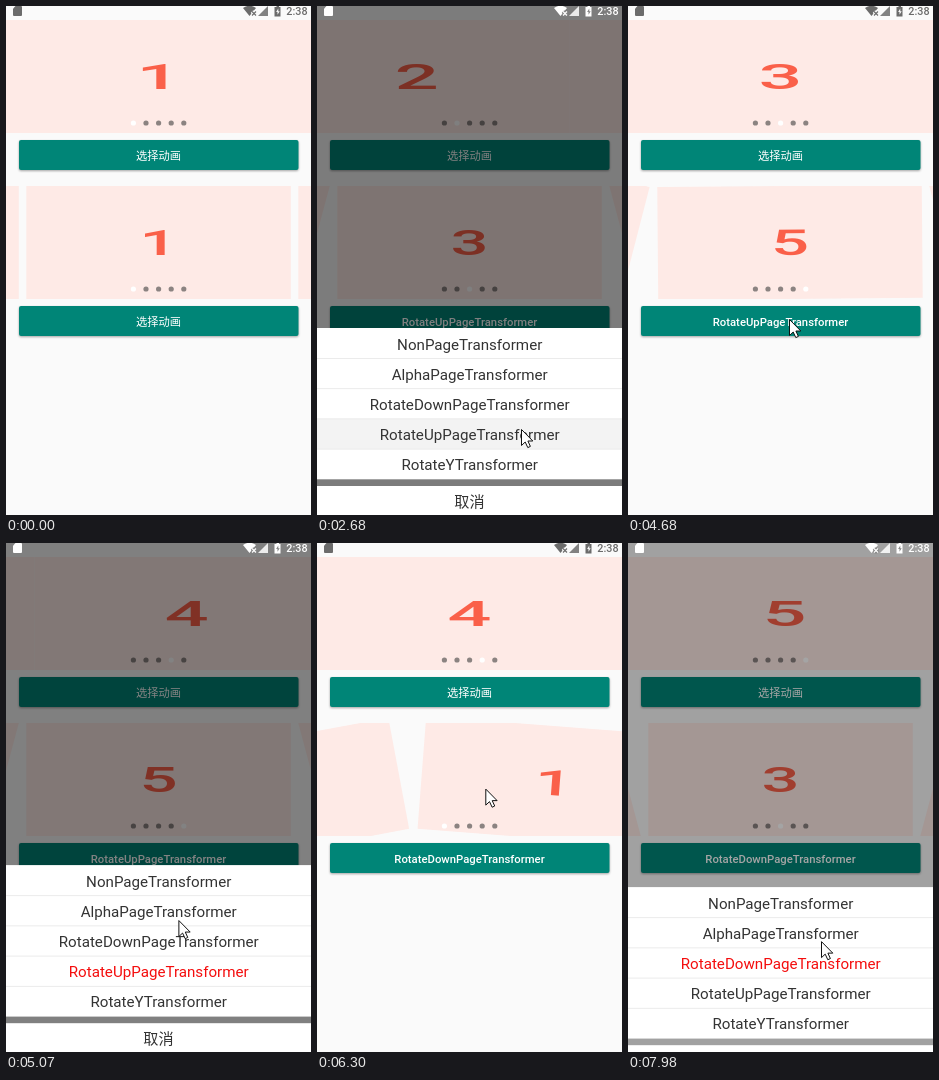
An HTML page for the animation above (8000 ms loop, 305 px wide and 509 px high).

```html
<!DOCTYPE html>
<html lang="zh">
<head>
<meta charset="utf-8">
<title>Banner transitions</title>
<style>
  html, body { margin: 0; width: 100%; height: 100%; overflow: hidden; background: #fafafa; }
  svg { display: block; width: 305px; height: 509px; }
  text { font-family: Roboto, "Noto Sans CJK SC", "Noto Sans CJK", sans-serif; text-anchor: middle; }
  .page rect { fill: #feeae6; }
  .digit { font-size: 35.5px; font-weight: 500; fill: #fa6049; }
  .button rect { fill: #008577; filter: drop-shadow(0 1px 1px rgba(0, 0, 0, .35)); }
  .button text { font-size: 11.3px; font-weight: 500; fill: #fff; }
  .row text { font-size: 15.15px; fill: #333; }
  .clock { font-size: 10.8px; font-weight: 500; }
  #status { fill: var(--ink); --ink: #6b6b6b; --back: #fafafa; }
  #status.light { --ink: #fff; --back: #868686; }
</style>
</head>
<body>
<svg viewBox="0 0 305 509">
  <defs>
    <clipPath id="topClip"><rect y="14" width="305" height="113"/></clipPath>
    <clipPath id="lowClip"><rect y="180" width="305" height="113"/></clipPath>
    <path id="cross" d="M246 5.500l4 4m0-4l-4 4"/>
  </defs>
  <rect width="305" height="509" fill="#fafafa"/>
  <g id="topPages" clip-path="url(#topClip)"></g>
  <g id="lowPages" clip-path="url(#lowClip)"></g>
  <g id="topDots"></g>
  <g id="lowDots"></g>
  <g class="button">
    <rect x="13" y="134" width="279.5" height="30" rx="2"/>
    <text x="152.5" y="153.8">选择动画</text>
  </g>
  <g class="button">
    <rect x="13" y="300" width="279.5" height="30" rx="2"/>
    <text id="label" x="152.5" y="319.8"></text>
  </g>
  <rect id="dim" width="305" height="509"/>
  <g id="status">
    <path d="M9.5 0H15Q16 0 16 1V9Q16 10 15 10H8Q7 10 7 9V2.7Z"/>
    <path d="M237 2Q243.500 -2.500 250 2L243.500 10Z"/>
    <use href="#cross" stroke="var(--back)" stroke-width="3.500"/>
    <use href="#cross" stroke="var(--ink)" stroke-width="1.100"/>
    <path d="M262 0V10H252Z" opacity=".85"/>
    <path d="M270.500 0h2.500v1h1.500v9.500h-6V1h2z"/>
    <path d="M272.300 2.500l-2.200 3.500h1.400v2.800l2.200-3.600h-1.400z" fill="var(--back)"/>
    <text class="clock" x="291" y="9">2:38</text>
  </g>
  <g id="sheet">
    <rect y="322" width="305" height="151" fill="#fff"/>
    <g id="rows"></g>
    <g class="row">
      <rect y="480" width="305" height="40" fill="#fff"/>
      <text x="152.500" y="500.500">取消</text>
    </g>
  </g>
  <g id="cursor">
    <circle id="press" r="12.300" fill="#fbe94f" opacity=".82"/>
    <path d="M.5 .5V16.500L4.200 13L6.800 18.600L9.400 17.400L6.900 12H11.800Z" fill="#fff" stroke="#111"/>
  </g>
</svg>
<script>
const LOOP = 8000, SLIDE = 700, FADE = 300, TICK = 76.7, FIRST_TICK = 146;
const ROW_TOP = 322.3, ROW_HEIGHT = 30.2;
const NAMES = ['Non', 'Alpha', 'RotateDown', 'RotateUp', 'RotateY'];
const fullName = name => name + (name === 'RotateY' ? 'Transformer' : 'PageTransformer');
const DOWN = 2, UP = 3;

const topSlides = [880, 2651, 4790, 7563];
const lowSlides = [925, 1500, 3540, 4325, 6130, 6800, 7200];
const picks = [{ at: 2670, row: UP }, { at: 5735, row: DOWN }];
const dialogs = [
  { open: 1470, close: 2700 },
  { open: 4760, close: 5790 },
  { open: 7755, close: 9000 }
];
const presses = [[1500, 1560], [3510, 3680], [4700, 4780], [6120, 6250], [7100, 7250], [7700, 7760]];
const pointer = [
  [140, 306, 512], [900, 235, 390], [1400, 208, 309], [1540, 208, 309],
  [1800, 279, 395], [2200, 193, 437], [2560, 204, 423], [2750, 204, 423],
  [3450, 230, 240], [3600, 230, 240], [3950, 130, 242], [4200, 215, 245],
  [4640, 161, 313], [4800, 161, 313], [5250, 180, 420], [5650, 168, 399],
  [5850, 168, 399], [6120, 230, 245], [6400, 130, 246], [6850, 215, 246],
  [7180, 215, 246], [7380, 130, 250], [7640, 188, 313], [7770, 188, 313],
  [7960, 193, 398], [8000, 193, 399]
];

const $ = id => document.getElementById(id);
const clamp = (v, lo = 0, hi = 1) => Math.min(hi, Math.max(lo, v));

function add(parent, tag, attrs = {}) {
  const el = document.createElementNS('http://www.w3.org/2000/svg', tag);
  for (const key in attrs) el.setAttribute(key, attrs[key]);
  return parent.appendChild(el);
}

function makeCarousel(id, box) {
  const pages = [-1, 0, 1].map(() => {
    const group = add($(id + 'Pages'), 'g', { class: 'page' });
    add(group, 'rect', { width: box.w, height: 113 });
    const digit = add(group, 'text', {
      class: 'digit',
      transform: `translate(${box.w / 2} 69) scale(${box.w / 140} 1)`
    });
    return { group, digit };
  });
  const dots = [0, 1, 2, 3, 4].map(i =>
    add($(id + 'Dots'), 'circle', { cx: 127.4 + i * 12.6, cy: box.y + 103, r: 2.6 }));
  return { ...box, pages, dots };
}

const topBanner = makeCarousel('top', { x: 0, y: 14, w: 305, pitch: 305 });
const lowBanner = makeCarousel('low', { x: 20.3, y: 180, w: 264.5, pitch: 272 });

const rows = NAMES.map((name, i) => {
  const y = ROW_TOP + i * ROW_HEIGHT;
  const group = add($('rows'), 'g', { class: 'row' });
  const back = add(group, 'rect', { y, width: 305, height: ROW_HEIGHT });
  if (i) add(group, 'rect', { y: y - 0.4, width: 305, height: 0.8, fill: '#e6e6e6' });
  const text = add(group, 'text', { x: 152.7, y: y + 21.2 });
  text.textContent = fullName(name);
  return { back, text };
});

// Each slide advances one page with a quintic ease-out.
const position = (slides, t) => slides.reduce(
  (sum, start) => sum + 1 - (1 - clamp((t - start) / SLIDE)) ** 5, 0);

// Pages swing up to 15 degrees about their top or bottom edge.
function tilt(mode, offset, w) {
  if (mode !== UP && mode !== DOWN) return '';
  const p = clamp(offset, -1, 1);
  const angle = 15 * p * (mode === UP ? -1 : 1);
  return `rotate(${angle} ${w * (1 - p) / 2} ${mode === UP ? 0 : 113})`;
}

function drawCarousel(c, slides, t, mode) {
  const pos = position(slides, t), base = Math.round(pos);
  c.pages.forEach(({ group, digit }, i) => {
    const index = base + i - 1, offset = index - pos;
    group.setAttribute('transform',
      `translate(${c.x + offset * c.pitch} ${c.y}) ${tilt(mode, offset, c.w)}`);
    digit.textContent = (index + 5) % 5 + 1;
  });
  c.dots.forEach((dot, i) => dot.setAttribute('fill', i === base % 5 ? '#fff' : '#8b8381'));
}

function pointerAt(t) {
  const next = pointer.findIndex(k => k[0] > t);
  if (next < 1) return [400, 600];
  const [t0, x0, y0] = pointer[next - 1], [t1, x1, y1] = pointer[next];
  const u = (t - t0) / (t1 - t0), e = u * u * (3 - 2 * u);
  return [x0 + (x1 - x0) * e, y0 + (y1 - y0) * e];
}

function drawDialog(t, pick) {
  const dialog = dialogs.find(d => t >= d.open && t < d.close + FADE);
  const opened = dialog ? clamp((t - dialog.open) / FADE) : 0;
  const closed = dialog ? clamp((t - dialog.close) / FADE) : 0;
  const shown = (1 - (1 - opened) ** 1.7) * (1 - closed * closed);
  const dim = 0.5 * opened * clamp(1 - closed * 1.4);
  $('sheet').setAttribute('transform', `translate(0 ${187 * (1 - shown)})`);
  $('sheet').setAttribute('visibility', dialog ? 'visible' : 'hidden');
  $('dim').setAttribute('opacity', dim);
  $('status').classList.toggle('light', dim > 0);

  const chosen = dialog && picks.filter(p => p.at < dialog.open).pop();
  const pressed = dialog && pick && pick.at > dialog.open ? pick.row : -1;
  rows.forEach(({ back, text }, i) => {
    back.setAttribute('fill', i === pressed ? '#f3f3f3' : '#fff');
    text.style.fill = chosen && chosen.row === i ? '#f40d0d' : '';
  });
}

function draw(time) {
  const t = time < FIRST_TICK ? 0
    : FIRST_TICK + Math.floor((time - FIRST_TICK) / TICK) * TICK;
  const pick = picks.filter(p => t >= p.at).pop();
  drawCarousel(topBanner, topSlides, t);
  drawCarousel(lowBanner, lowSlides, t, pick && pick.row);
  $('label').textContent = pick ? fullName(NAMES[pick.row]) : '选择动画';
  drawDialog(t, pick);
  $('cursor').setAttribute('transform', `translate(${pointerAt(t)})`);
  const down = presses.some(([from, to]) => t >= from && t < to);
  $('press').setAttribute('visibility', down ? 'visible' : 'hidden');
}

const began = performance.now();
function tick() {
  draw((performance.now() - began) % LOOP);
  requestAnimationFrame(tick);
}
tick();
</script>
</body>
</html>
```
